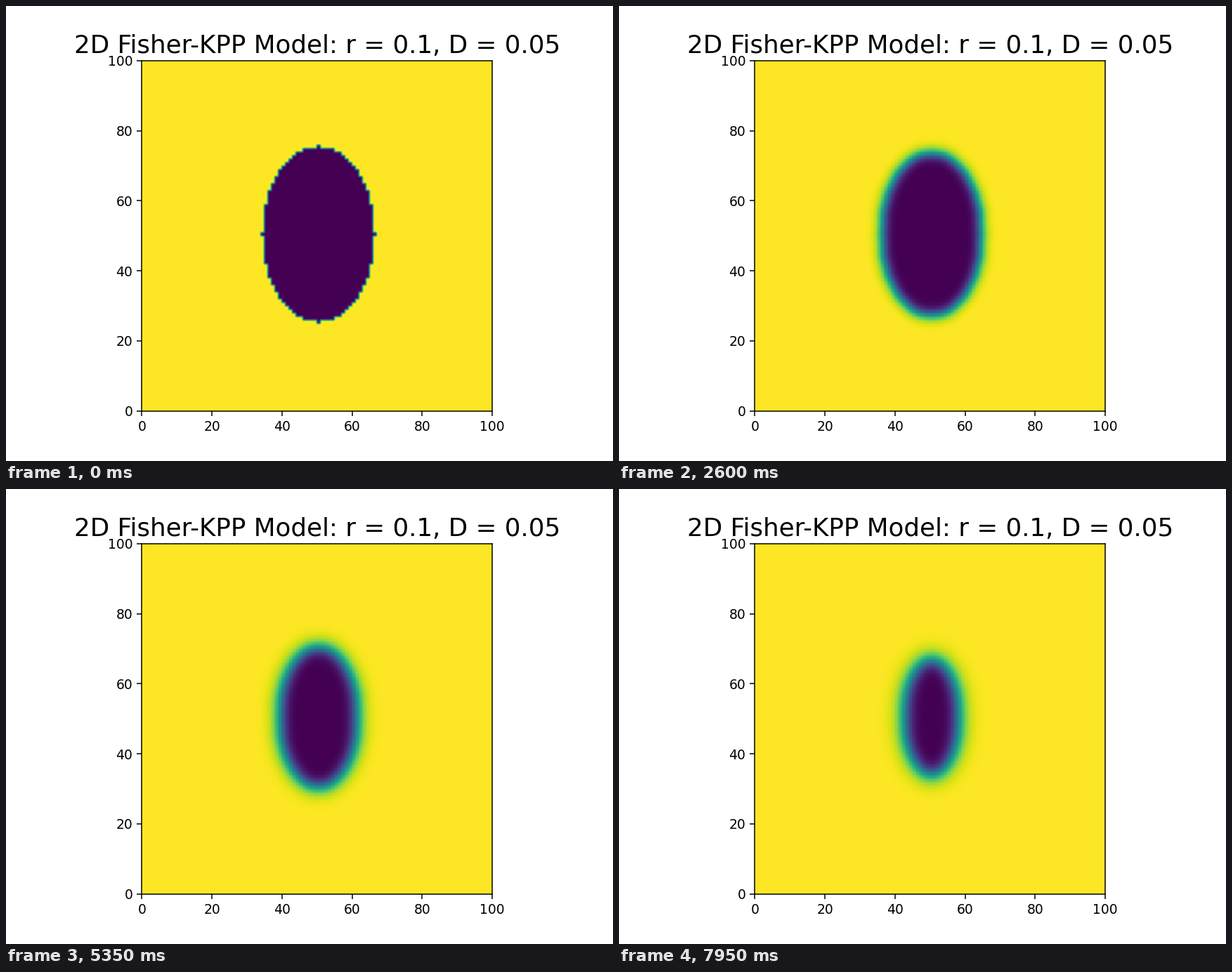
These frames come from a looping animation (864x648 px, 8 s). A matplotlib script:

```python
import numpy as np
import matplotlib.pyplot as plt
from matplotlib.animation import FuncAnimation

N = 100                  # grid points per side
R, D = 0.1, 0.05         # growth rate, diffusion
FRAMES, INTERVAL = 160, 50
FRAME_DT, SUBSTEPS = 0.5, 2


def laplacian(u):
    p = np.pad(u, 1, mode="edge")
    return p[2:, 1:-1] + p[:-2, 1:-1] + p[1:-1, 2:] + p[1:-1, :-2] - 4 * u


def simulate():
    """Density fields of the Fisher-KPP equation, one per frame."""
    row, col = np.mgrid[:N, :N] - N // 2
    u = np.where((col / 16) ** 2 + (row / 25) ** 2 <= 1, 0.0, 1.0)
    dt = FRAME_DT / SUBSTEPS
    fields = [u]
    for _ in range(FRAMES - 1):
        for _ in range(SUBSTEPS):
            u = u + dt * (D * laplacian(u) + R * u * (1 - u))
        fields.append(u)
    return fields


fields = simulate()

plt.rcParams["font.family"] = "DejaVu Sans"
fig, ax = plt.subplots(figsize=(6.4, 4.8), dpi=135)
image = ax.imshow(fields[0], cmap="viridis", vmin=0, vmax=1, origin="lower",
                  extent=(0, N, 0, N), interpolation="hanning")
ax.set(xticks=range(0, N + 1, 20), yticks=range(0, N + 1, 20))
ax.set_title(f"2D Fisher-KPP Model: r = {R}, D = {D}", fontsize=19)


def draw(i):
    image.set_data(fields[i])
    return [image]


def start():
    return draw(0)


anim = FuncAnimation(fig, draw, frames=FRAMES, init_func=start,
                     interval=INTERVAL, repeat=True, repeat_delay=0, blit=False)
plt.show()
```
